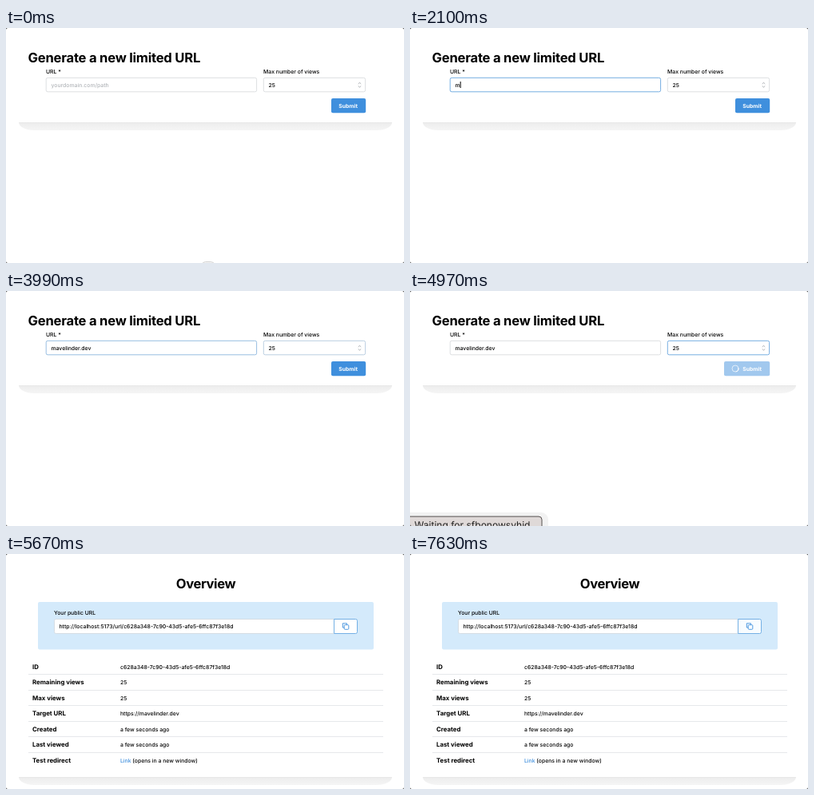
Recreate the animation shown at these times as an HTML page with a canvas. Size 498 by 294 pixels, loop 8 s.

```html
<!DOCTYPE html>
<html lang="en">
<head>
<meta charset="utf-8">
<title>Limited URL generator</title>
<style>
html, body { margin: 0; width: 100%; height: 100%; overflow: hidden; background: #fff; }
canvas { display: block; width: 498px; height: 294px; }
</style>
</head>
<body>
<canvas id="stage"></canvas>
<script>
const W = 498, H = 294, LOOP = 8000, STEP = 70;
const canvas = document.getElementById('stage');
const ctx = canvas.getContext('2d');
const dpr = window.devicePixelRatio || 1;
canvas.width = W * dpr;
canvas.height = H * dpr;

const FONT = 'Inter, "Liberation Sans", sans-serif';
const BODY = 6.85, HEAD = 16.6;
const BLUE = '#3f8fdd', LINE = [221, 223, 226], FOCUS = [118, 174, 226];
const DOMAIN = 'mavelinder.dev';
const ID = 'c628a348-7c90-43d5-afe5-6ffc87f3e18d';

// Time at which each further count of characters is visible.
const KEYS = [
  [2100, 1], [2240, 2], [2380, 3], [2520, 4], [2590, 5], [2800, 7], [2870, 8],
  [2940, 9], [3080, 10], [3220, 11], [3290, 12], [3360, 13], [3500, 14]
];

// Progress of a change whose first visible step is at a and last at b.
const ramp = (t, a, b) => Math.min(1, Math.max(0, (t - a + STEP) / (b - a + STEP)));
const mix = (a, b, k) => `rgb(${a.map((v, i) => Math.round(v + (b[i] - v) * k)).join()})`;

function text(str, x, y, { size = BODY, weight = 450, color = '#000', align = 'left', gap = 0 } = {}) {
  ctx.font = `${weight} ${size}px ${FONT}`;
  ctx.textRendering = 'geometricPrecision';
  ctx.letterSpacing = gap + 'px';
  ctx.textAlign = align;
  ctx.fillStyle = color;
  ctx.fillText(str, x, y);
  return ctx.measureText(str).width;
}

function box(x, y, w, h, r, fill, stroke, width = 1) {
  ctx.beginPath();
  ctx.roundRect(x, y, w, h, r);
  if (fill) { ctx.fillStyle = fill; ctx.fill(); }
  if (stroke) { ctx.strokeStyle = stroke; ctx.lineWidth = width; ctx.stroke(); }
}

function withAlpha(a, draw) {
  if (a <= 0) return;
  ctx.save();
  ctx.globalAlpha = a;
  draw();
  ctx.restore();
}

function path(points, color, width) {
  ctx.beginPath();
  points.forEach(([x, y], i) => i ? ctx.lineTo(x, y) : ctx.moveTo(x, y));
  ctx.strokeStyle = color;
  ctx.lineWidth = width;
  ctx.stroke();
}

function cardShadow(y) {
  const g = ctx.createLinearGradient(0, y, 0, y + 10);
  g.addColorStop(0, '#e3e3e3');
  g.addColorStop(0.12, '#ededed');
  g.addColorStop(0.5, '#f1f1f1');
  g.addColorStop(1, '#f5f5f5');
  const corner = { x: 19, y: 10 };
  box(16, y, 467, 10, [0, 0, corner, corner], g);
}

function clickRing(x, y, alpha) {
  withAlpha(alpha * 0.8, () => {
    ctx.beginPath();
    ctx.arc(x, y, 20, 0, Math.PI * 2);
    ctx.strokeStyle = '#969696';
    ctx.lineWidth = 2;
    ctx.stroke();
  });
}

function spinner(x, y, t) {
  const start = (t / 1000) * Math.PI * 2;
  ctx.strokeStyle = '#fff';
  ctx.lineWidth = 1;
  withAlpha(0.65, () => {
    ctx.beginPath();
    ctx.arc(x, y, 4, 0, Math.PI * 2);
    ctx.stroke();
  });
  ctx.beginPath();
  ctx.arc(x, y, 4, start, start + Math.PI / 2);
  ctx.stroke();
}

function urlField(t, focus) {
  box(50.2, 62.3, 263.4, 17.5, 2, '#fff', mix(LINE, FOCUS, focus));
  let count = 0;
  for (const [at, n] of KEYS) if (t >= at) count = n;
  let end = 0;
  if (count) end = text(DOMAIN.slice(0, count), 56.5, 73.5);
  else text('yourdomain.com/path', 56.5, 73.5, { color: '#b1b4b8' });
  const caret = (t >= 1050 && t < 1540) || (t >= 2100 && t < 3990);
  if (caret) {
    ctx.fillStyle = '#000';
    ctx.fillRect(56.6 + end, 67, 1, 8);
  }
}

function maxField(focus) {
  box(322.3, 62.3, 127.3, 17.5, 2, '#fff', mix(LINE, FOCUS, focus));
  text('25', 328.5, 73.5);
  path([[440.8, 69.9], [442.5, 68.3], [444.2, 69.9]], '#858a90', 0.7);
  path([[440.8, 72.5], [442.5, 74.1], [444.2, 72.5]], '#858a90', 0.7);
}

function submitButton(t) {
  const loading = t >= 4340;
  const left = loading ? 393 : 407;
  box(left, 88, 450.2 - left, 18.2, 2, loading ? '#a1c8ee' : BLUE);
  if (loading) spinner(407, 97, t);
  text('Submit', 416.3, 99.5, { weight: 700, color: '#fff' });
}

function formPage(t) {
  const moved = ramp(t, 3990, 4130);
  cardShadow(118);
  text('Generate a new limited URL', 27.5, 43, { size: HEAD, weight: 700, gap: -0.22 });
  text('URL *', 50, 57, { weight: 500 });
  text('Max number of views', 322, 57, { weight: 500 });
  urlField(t, ramp(t, 1050, 1120) * (1 - moved));
  maxField(moved);
  submitButton(t);
  clickRing(188, 77, ramp(t, 630, 910) * (1 - ramp(t, 1190, 1330)));
  withAlpha(1 - ramp(t, 70, 350), () => box(245.5, 292.5, 15, 8, 4, '#f4f4f4', '#d2d2d2'));
}

function copyButton(hover) {
  box(410.5, 81.5, 29, 18, [0, 2, 2, 0], hover ? '#f8fcff' : '#fff', '#74b0e5');
  box(423.2, 88.7, 5.6, 5.6, 1, null, BLUE, 0.9);
  path([[423, 92], [421.3, 92], [421.3, 86.8], [426.5, 86.8], [426.5, 88.5]], BLUE, 0.9);
}

function overviewPage(t) {
  const rows = [
    ['ID', ID], ['Remaining views', '25'], ['Max views', '25'],
    ['Target URL', 'https://' + DOMAIN], ['Created', 'a few seconds ago'],
    ['Last viewed', 'a few seconds ago'], ['Test redirect', 'Link']
  ];
  cardShadow(279);
  text('Overview', 250, 43, { size: HEAD, weight: 700, align: 'center', gap: -0.4 });
  box(40, 60, 420, 59.5, 2, '#d4eafb');
  text('Your public URL', 60, 76.4);
  box(60.5, 81.5, 350, 18, [2, 0, 0, 2], '#fff', '#d5dde4');
  text('http://localhost:5173/url/' + ID, 66.5, 93);
  copyButton(t >= 6930);

  rows.forEach(([label, value], i) => {
    const y = 141 + i * 19.5, last = i === rows.length - 1;
    text(label, 33, y + 2.8, { size: 7.83, weight: 700 });
    const w = text(value, 143, y + 2.5, { color: last ? BLUE : '#000' });
    if (last) {
      text(' (opens in a new window)', 143 + w, y + 2.5);
    } else {
      ctx.fillStyle = '#e6e8eb';
      ctx.fillRect(28, Math.round(y + 9), 444, 1);
    }
  });
  clickRing(433, 91, ramp(t, 7070, 7350) * (1 - ramp(t, 7420, 7630)));
}

function statusBar(alpha) {
  withAlpha(alpha, () => {
    box(-10, 277, 183, 30, 9, '#f2f2f2');
    box(-10, 282.1, 175, 30, 4, '#dfd9d8', '#55504f');
    text('Waiting for sfbonowsvhid', 5.5, 296.6, { size: 12.05, weight: 400, color: '#222' });
  });
}

function windowCorners() {
  ctx.beginPath();
  ctx.rect(0, 0, W, H);
  ctx.roundRect(0, 0, W, H, 2.5);
  ctx.fillStyle = '#444';
  ctx.fill('evenodd');
}

function render(t) {
  ctx.setTransform(dpr, 0, 0, dpr, 0, 0);
  ctx.fillStyle = '#fff';
  ctx.fillRect(0, 0, W, H);
  if (t < 5040) formPage(t);
  else overviewPage(t);
  statusBar(ramp(t, 4480, 4690) * (1 - ramp(t, 5250, 5460)));
  windowCorners();
}

const begin = performance.now();
function tick() {
  const t = (performance.now() - begin) % LOOP;
  render(Math.floor(t / STEP) * STEP);
  requestAnimationFrame(tick);
}
tick();
</script>
</body>
</html>
```
